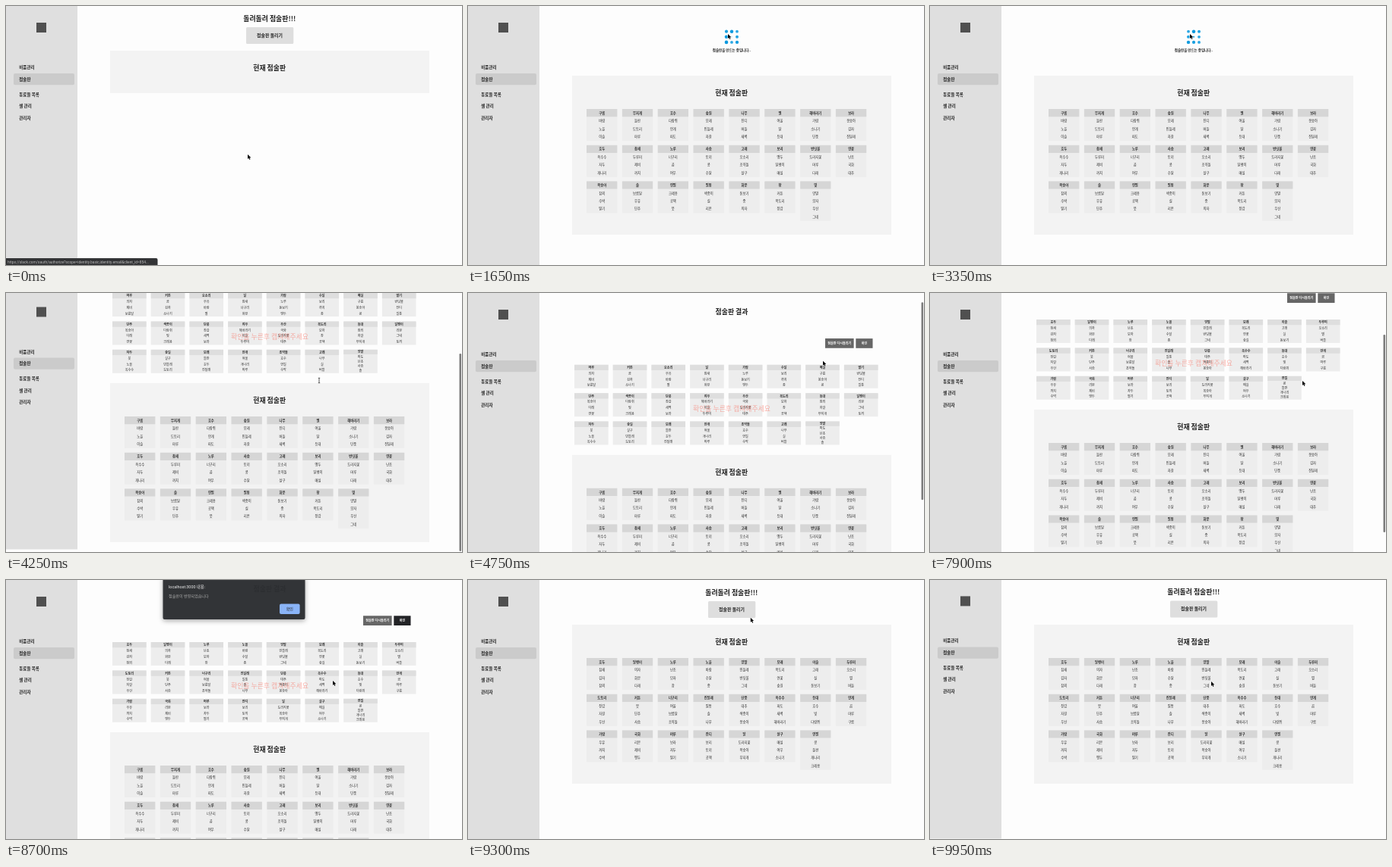
Write an HTML page with a canvas that moves like this. It is 600 px wide and 342 px high and loops after 10 s.

```html
<!DOCTYPE html>
<html lang="ko">
<head>
<meta charset="utf-8">
<style>
html, body { margin: 0; width: 100%; height: 100%; overflow: hidden; background: #fdfdfd; }
canvas { display: block; width: 600px; height: 342px; }
</style>
</head>
<body>
<canvas id="stage"></canvas>
<script>
const LOOP = 10000;
const canvas = document.getElementById('stage');
const ctx = canvas.getContext('2d');
const ratio = Math.max(1, window.devicePixelRatio || 1);
canvas.width = 600 * ratio;
canvas.height = 342 * ratio;

const KOREAN = '"Noto Sans CJK KR", "Noto Sans CJK", sans-serif';
const LATIN = 'Roboto, sans-serif';
const INK = '#222';

const names = `구름 바람 노을 이슬 무지개 들판 도토리 마루 호수 다람쥐 안개 파도
숲길 모래 민들레 자갈 나무 잔디 버들 새벽 별 여울 달 등대 해바라기 가람 소나기 단풍
보라 봉숭아 감자 진달래 호두 옥수수 자두 개나리 참새 두루미 제비 까치 노루 너구리 곰 여우
사슴 토끼 콩 수달 고래 오소리 조약돌 살구 보리 앵두 달팽이 매실 반딧불 도라지꽃 머루 다래
연꽃 난초 국화 대추 복숭아 참외 수박 딸기 솔 보름달 우유 단추 연필 크레용 공책 붓
필통 색종이 실 리본 화분 돋보기 종 의자 창 커튼 목도리 장갑 빛 양말 모자 우산 그네`.split(/\s+/);

function shuffle(list, seed) {
  const out = [...list];
  for (let i = out.length - 1; i > 0; i--) {
    seed = (seed * 16807) % 2147483647;
    const j = seed % (i + 1);
    [out[i], out[j]] = [out[j], out[i]];
  }
  return out;
}

// 23 teams of four; the last one takes the extra member
const teams = list => Array.from({ length: 23 }, (_, i) =>
  list.slice(i * 4, i < 22 ? i * 4 + 4 : undefined));

const oldTeams = teams(names);
const firstDraw = teams(shuffle(names, 4211));
const newTeams = teams(shuffle(names, 90733));

// Keys: time, then values; eased between neighbours
const cursorKeys = [
  [50, 318, 196], [400, 250, 121], [550, 250, 121], [720, 387, 78], [900, 342, 36.5],
  [1100, 342, 36.5], [1200, 342, 37], [3500, 342, 37], [4200, 412, 112], [4450, 412, 112],
  [4900, 486, 82], [5100, 486, 82], [5450, 399, 110], [6550, 399, 110], [7500, 490, 116],
  [8050, 490, 116], [8350, 520, 53], [8480, 520, 53], [8700, 430, 133], [9050, 372, 37],
  [9200, 372, 37], [9550, 371, 100], [9700, 371, 100], [9900, 370, 134]
];
const scrollKeys = [
  [3650, -30], [4100, 82], [4450, 82], [4850, -30], [7600, -30], [7880, 47], [8000, 47], [8300, 0]
];

function track(keys, t) {
  const next = keys.findIndex(k => k[0] > t);
  if (next === 0) return keys[0].slice(1);
  if (next < 0) return keys[keys.length - 1].slice(1);
  const a = keys[next - 1], b = keys[next];
  const u = (t - a[0]) / (b[0] - a[0]);
  const e = u * u * (3 - 2 * u);
  return a.slice(1).map((v, i) => v + (b[i + 1] - v) * e);
}

function box(x, y, w, h, color, radius = 0) {
  ctx.fillStyle = color;
  ctx.beginPath();
  ctx.roundRect(x, y, w, h, radius);
  ctx.fill();
}

// y is the middle of the line
function label(str, x, y, size, { color = INK, weight = 400, align = 'center', font = KOREAN } = {}) {
  ctx.font = `${weight} ${size}px ${font}`;
  ctx.textAlign = align;
  ctx.fillStyle = color;
  ctx.fillText(str, x, y + size * 0.37);
}

function sidebar(dy) {
  box(0, dy, 94, 342, '#dfdfdf');
  box(40, 22 + dy, 13, 13, '#505050');
  box(10, 89 + dy, 80, 15.3, '#cbcbcb', 2);
  [['비품관리', 81], ['점술판', 96.5], ['동료들 목록', 116.5], ['셀 관리', 132], ['관리자', 147.7]]
    .forEach(([str, y]) => label(str, 17.3, y + dy, 5.5, { weight: 600, align: 'left' }));
}

function grid(list, g) {
  list.forEach((team, i) => {
    const x = g.x + (i % 8) * g.dx;
    const y = g.y + Math.floor(i / 8) * g.dy;
    const row = g.row(team.length);
    box(x, y, g.w, row * team.length + g.pad, '#ededed');
    box(x, y, g.w, Math.min(row, g.head), g.color);
    team.forEach((name, k) => label(name, x + g.w / 2, y + row * (k + 0.5), g.size,
      { weight: k ? 400 : 600, color: '#2a2a2a' }));
  });
}

function panel(y, list) {
  box(137, y, 420, list ? 210 : 56, '#f3f3f3');
  label('현재 점술판', 346.7, y + 23, 8.9, { weight: 600 });
  if (list) grid(list, {
    x: 156, y: y + 44, dx: 46.85, dy: 47.7, w: 40.3, row: () => 10.4,
    pad: 0.4, head: 10.2, size: 4.3, color: '#d6d6d6'
  });
}

function home(list, dy) {
  label('돌려돌려 점술판!!!', 346.8, 16.8 + dy, 8.9, { weight: 700 });
  box(316, 28 + dy, 62.3, 22, '#dedede', 1.5);
  label('점술판 돌리기', 347, 38.7 + dy, 5.9, { weight: 600 });
  panel(59, list);
}

function loading(t) {
  for (let i = 0; i < 9; i++) {
    const wave = 0.5 + 0.5 * Math.cos(t / 150 + i * 2.4);
    const scale = i === 4 ? 0.5 * wave : 0.82 + 0.18 * wave;
    ctx.fillStyle = `rgba(8, 152, 222, ${0.85 + 0.15 * wave})`;
    ctx.beginPath();
    ctx.arc(340 + (i % 3) * 7, 33.7 + Math.floor(i / 3) * 7.1, 2.3 * scale, 0, 7);
    ctx.fill();
  }
  label('점술판을 만드는 중입니다..', 347, 58.5, 4.5, { weight: 600 });
  panel(92, oldTeams);
}

function result(list, scroll, pressed) {
  label('점술판 결과', 347, 12 - scroll, 8.9, { weight: 600 });
  box(470, 47.3 - scroll, 37.6, 12.7, '#666');
  label('점술판 다시돌리기', 488.8, 53.8 - scroll, 4.1, { color: '#fff', weight: 600 });
  box(510.3, 47.3 - scroll, 22.2, 12.7, pressed ? '#222326' : '#666');
  label('확인', 521.4, 53.8 - scroll, 4.1, { color: '#fff', weight: 600 });
  grid(list, {
    x: 140, y: 82 - scroll, dx: 50.7, dy: 37.4, w: 44.6, row: n => 31 / n,
    pad: 0, head: 7.3, size: 4.1, color: '#dedede'
  });
  label('확인을 누른후 캡쳐해주세요', 347, 139.6 - scroll, 8.9, { color: 'rgba(255, 60, 40, .38)', weight: 500 });
  panel(201 - scroll, oldTeams);
}

function alertBox() {
  ctx.save();
  ctx.shadowColor = 'rgba(0, 0, 0, .35)';
  ctx.shadowBlur = 6 * ratio;
  ctx.shadowOffsetY = 2 * ratio;
  box(206.5, -4, 187, 56, 'rgba(45, 47, 50, .96)', 2);
  ctx.restore();
  label('localhost:3000 내용:', 214, 8.7, 5.4, { color: '#f0f0f0', align: 'left', font: 'Roboto, ' + KOREAN });
  label('점술판이 반영되었습니다', 214, 20.7, 5.1, { color: '#aaa', align: 'left' });
  box(360, 31.5, 26.6, 13.5, '#8ab4f8', 2);
  label('확인', 373.3, 38.2, 5, { color: '#222' });
}

function statusBar() {
  box(-3, 333, 202.5, 12, '#333436', 2);
  label('https://slack.com/oauth/authorize?scope=identity.basic,identity.email&client_id=854...',
    2, 338, 4.85, { color: '#bdbdbd', align: 'left', font: LATIN });
}

function pointer(x, y, caret) {
  ctx.save();
  ctx.translate(x, y);
  ctx.beginPath();
  if (caret) {
    ctx.strokeStyle = '#333';
    ctx.lineWidth = 0.8;
    [[-1.2, 0.3, 1.2, 0.3], [0, 0.3, 0, 6.7], [-1.2, 6.7, 1.2, 6.7]].forEach(([a, b, c, d]) => {
      ctx.moveTo(a, b);
      ctx.lineTo(c, d);
    });
    ctx.stroke();
  } else {
    [[0, 0], [0, 6], [1.4, 4.8], [2.4, 7], [3.4, 6.6], [2.5, 4.4], [4.3, 4.3]]
      .forEach(p => ctx.lineTo(...p));
    ctx.closePath();
    ctx.strokeStyle = '#fff';
    ctx.lineWidth = 0.9;
    ctx.stroke();
    ctx.fillStyle = '#000';
    ctx.fill();
  }
  ctx.restore();
}

function draw(t) {
  const within = (a, b) => t >= a && t < b;
  const drawn = within(3500, 5100) || within(7100, 9150);
  const [scroll] = track(scrollKeys, t);
  const nudge = t >= 9700 ? -0.6 * Math.min(1, (t - 9700) / 200) : 0;

  ctx.setTransform(ratio, 0, 0, ratio, 0, 0);
  box(0, 0, 600, 342, '#fdfdfd');
  sidebar(drawn ? Math.min(0, 78.5 - scroll) : nudge);

  if (drawn) result(t < 6000 ? firstDraw : newTeams, scroll, t >= 8400);
  else if (within(1400, 3500) || within(5100, 7100)) loading(t);
  else home(t < 100 ? null : t < 1400 ? oldTeams : newTeams, nudge);

  if (within(3650, 4950) || within(7600, 8450))
    box(596.5, 80 - (82 - scroll) * 0.714, 2.6, 261, '#7c7c7c', 1.3);
  if (within(8450, 9150)) alertBox();
  if (t < 250) statusBar();

  pointer(...track(cursorKeys, t), within(4150, 4500));
}

function frame() {
  draw(performance.now() % LOOP);
  requestAnimationFrame(frame);
}
frame();
</script>
</body>
</html>
```
